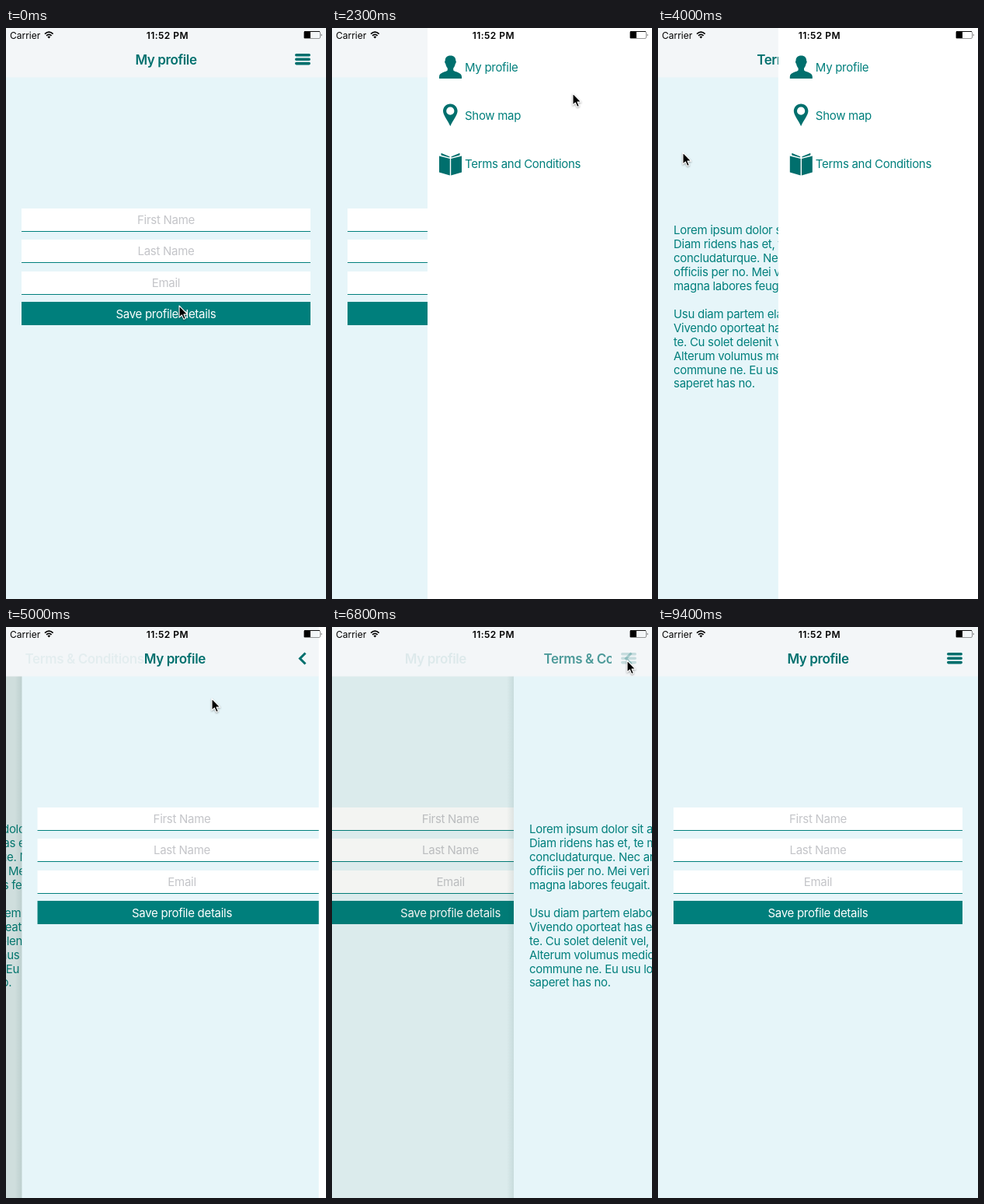
An HTML page for the animation above (9.5 s loop, 412 px wide and 734 px high).

```html
<!DOCTYPE html>
<html lang="en">
<head>
<meta charset="utf-8">
<title>Slide menu</title>
<style>
html, body { margin: 0; width: 100%; height: 100%; overflow: hidden; background: #e6f5f9; }
svg { display: block; width: 100vw; height: 100vh; font-family: Inter, Roboto, sans-serif; font-size: 15px; letter-spacing: -.29px; }
text { white-space: pre; }
.body { fill: #007f7c; }
.title { fill: #00706e; font-size: 17px; font-weight: 600; letter-spacing: -.4px; text-anchor: middle; }
.hint { fill: #c4c5c9; text-anchor: middle; }
.icon { fill: #006f6d; }
.line { stroke: #006f6d; fill: none; stroke-linecap: round; stroke-linejoin: round; }
.status { font-size: 12px; letter-spacing: 0; }
.clock { font-weight: 600; letter-spacing: .45px; text-anchor: middle; }
#cursor { filter: drop-shadow(0 1px 1px rgba(0, 0, 0, .35)); }
</style>
</head>
<body>
<svg viewBox="0 0 412 734" preserveAspectRatio="none">
  <defs>
    <linearGradient id="shade">
      <stop offset="0" stop-color="#003c3c" stop-opacity="0"/>
      <stop offset="1" stop-color="#003c3c" stop-opacity=".09"/>
    </linearGradient>
    <clipPath id="titleArea"><rect width="360" height="64"/></clipPath>
  </defs>
  <g id="pages"></g>
  <rect width="412" height="63.5" fill="#f3f6f8"/>
  <g clip-path="url(#titleArea)">
    <text class="title" id="titleA" y="47">My profile</text>
    <text class="title" id="titleB" y="47">Terms &amp; Conditions</text>
    <text class="title" id="titleC" y="47">My profile</text>
  </g>
  <path id="bars" class="line" stroke-width="3.6" d="M373.8 34.8H390.2M373.8 40.2H390.2M373.8 45.6H390.2"/>
  <path id="back" class="line" stroke-width="3" style="stroke-linecap:butt;stroke-linejoin:miter" d="M385.5 33.5L378.5 40.5L385.5 47.5"/>
  <g id="menu">
    <rect width="412" height="734" fill="#fff"/>
    <g class="icon">
      <path transform="translate(15 35)" d="M14.5 0.5C19 0.5 21.3 3 21.3 7C22.2 7.4 22 10 20.8 11C20.2 14 19.2 15.6 18.2 16.8V19.2C19.2 21.6 29 21.4 29 27.5V30H0V27.5C0 21.4 9.8 21.6 10.8 19.2V16.8C9.8 15.6 8.8 14 8.2 11C7 10 6.8 7.4 7.7 7C7.7 3 10 0.5 14.5 0.5Z"/>
      <path fill-rule="evenodd" transform="translate(20 97)" d="M9.3 0.5C14.4 0.5 18.6 4.6 18.6 9.8C18.6 15 12.5 22 9.3 29.3C6.1 22 0 15 0 9.8C0 4.6 4.2 .5 9.3 .5ZM9.3 4.6A5.1 5.1 0 1 0 9.3 14.8A5.1 5.1 0 1 0 9.3 4.6Z"/>
      <path transform="translate(15 160)" d="M0 4.5L13.8 8V29.5L0 25.5ZM29 4.5L15.2 8V29.5L29 25.5ZM2.5 .8L13.4 5.3V6.4L2.5 3.5ZM26.5 .8L15.6 5.3V6.4L26.5 3.5Z"/>
    </g>
    <g class="body">
      <text x="48" y="55.5">My profile</text>
      <text x="48" y="117.5">Show map</text>
      <text x="48" y="179.5">Terms and Conditions</text>
    </g>
  </g>
  <g class="status">
    <text x="5" y="14">Carrier</text>
    <text class="clock" x="207.8" y="14">11:52 PM</text>
    <g fill="none" stroke="#000" stroke-width="1.7">
      <path d="M50 7.6Q55.3 2.6 60.6 7.6M52 9.9Q55.3 6.9 58.6 9.9"/>
    </g>
    <path d="M53.4 11.3Q55.3 9.7 57.2 11.3L55.3 13.4Z"/>
    <rect x="383.5" y="4.5" width="21" height="9" rx="1.5" fill="none" stroke="#000" stroke-width=".4"/>
    <path d="M384 4.5H404" stroke="#000" stroke-width=".9"/>
    <rect x="384" y="5" width="8" height="8"/>
    <path d="M405.8 7.2Q407.4 9 405.8 10.8Z"/>
  </g>
  <path id="cursor" d="M0 0V15.2L3.4 12L5.8 17.4L8.3 16.3L6 11.1H10.8Z" fill="#000" stroke="#fff" stroke-width="1.1" stroke-linejoin="round"/>
</svg>
<script>
const W = 412, OPEN = 123, LOOP = 9500;
const $ = id => document.getElementById(id);
const clamp = v => Math.max(0, Math.min(1, v));
const mix = (a, b, p) => a + (b - a) * p;
const smooth = p => p * p * (3 - 2 * p);
const easeOut = p => 1 - (1 - p) ** 3;
const span = (t, start, len) => clamp((t - start) / len);
const settle = (t, start) => easeOut(span(t, start, 500));

const field = (y, label) => `<rect x="20" y="${y}" width="372" height="29" fill="#fff"/>
  <rect x="20" y="${y + 29}" width="372" height="1" fill="#007f7c"/>
  <text class="hint" x="206" y="${y + 20.3}">${label}</text>`;

const profile = field(232, "First Name") + field(272, "Last Name") + field(313, "Email") +
  `<rect x="20" y="352" width="372" height="30" fill="#007f7c"/>
  <text x="206" y="372.5" fill="#fff" text-anchor="middle">Save profile details</text>`;

const copy = ["Lorem ipsum dolor sit amet, ea per vocent tamquam.", "Diam ridens has et, te mea dicant nostro euismod",
  "concludaturque. Nec an quis movet, ut modo facer", "officiis per no. Mei veri elitr nusquam ei, vix at",
  "magna labores feugait.", "", "Usu diam partem elaboraret ad, ne vim sonet.", "Vivendo oporteat has ei, an nam veniam delectus",
  "te. Cu solet delenit vel, pro et alia mundi assum.", "Alterum volumus mediocrem eu, sit id tota dicit",
  "commune ne. Eu usu lorem populo, an eos idque", "saperet has no."];
const terms = copy.map((s, i) => `<text class="body" x="20" y="${265.3 + i * 17.92}">${s}</text>`).join("");

const page = (id, content) => `<g id="page${id}">
  <rect x="-9" width="9" height="734" fill="url(#shade)"/>
  <rect width="412" height="734" fill="#e6f5f9"/>${content}
  <rect id="dim${id}" width="412" height="734" fill="#203000"/></g>`;
$("pages").innerHTML = page("A", profile) + page("B", terms) + page("C", profile);

// Pointer waypoints: time, x, y
const path = [
  [0, 223, 357], [1000, 372, 38], [1600, 374, 41], [2300, 310, 84], [2650, 272, 170], [2850, 272, 172],
  [3550, 288, 150], [4000, 32, 160], [4100, 32, 160], [4500, 268, 43], [4680, 268, 46], [5000, 265, 92],
  [5600, 330, 74], [6000, 381, 42], [6800, 380, 43], [7650, 364, 150], [8000, 233, 158], [8230, 58, 161],
  [8300, 58, 161], [8600, 368, 164], [8750, 372, 168], [9300, 224, 348]
];

function pointer(t) {
  const i = path.findIndex(p => p[0] > t);
  if (i < 0) return path[path.length - 1].slice(1);
  const [a, b] = [path[i - 1], path[i]];
  const p = smooth(span(t, a[0], b[0] - a[0]));
  return [mix(a[1], b[1], p), mix(a[2], b[2], p)];
}

function menuX(t, x) {
  const drag = from => Math.max(OPEN, Math.min(W, W - from + x));
  if (t < 1590) return W;
  if (t < 2800) return mix(W, OPEN, settle(t, 1590));
  if (t < 3550) return mix(OPEN, W, settle(t, 2800));
  if (t < 4000) return drag(289);
  if (t < 4660) return mix(155, OPEN, settle(t, 4000));
  if (t < 7650) return mix(OPEN, W, settle(t, 4660));
  if (t < 8300) return drag(364);
  return mix(OPEN, W, smooth(span(t, 8300, 300)));
}

const stackX = (t, push, pop) => W * (1 - settle(t, push) + settle(t, pop));

function place(id, x, cover) {
  const off = 1 - cover / W;
  const g = $("page" + id);
  g.setAttribute("transform", `translate(${x - .3 * W * off})`);
  g.setAttribute("visibility", x >= W || off >= 1 ? "hidden" : "visible");
  $("dim" + id).setAttribute("opacity", .12 * off);
}

function title(id, x, cover, center, left, right) {
  const q = x / W, s = 1 - cover / W;
  const el = $("title" + id);
  el.setAttribute("x", center + right * q - left * s);
  el.setAttribute("opacity", s >= 1 ? 0 : (1 - q * q) * ((1 - s) ** 5 + .06 * s));
}

function draw(t) {
  const [x, y] = pointer(t);
  const b = stackX(t, 2800, 6679), c = stackX(t, 4685, 6050);
  place("A", 0, b);
  place("B", b, c);
  place("C", c, W);
  title("A", 0, b, 206, 168, 0);
  title("B", b, c, 203.7, 108, 256);
  title("C", c, W, 206, 0, 227);
  $("bars").setAttribute("opacity", (b / W) ** 3);
  $("back").setAttribute("opacity", (1 - b / W) ** 1.5);
  $("menu").setAttribute("transform", `translate(${menuX(t, x)})`);
  $("cursor").setAttribute("transform", `translate(${x} ${y})`);
  $("cursor").setAttribute("visibility", t < 9350 ? "visible" : "hidden");
}

function tick() {
  draw(performance.now() % LOOP);
  requestAnimationFrame(tick);
}
tick();
</script>
</body>
</html>
```
